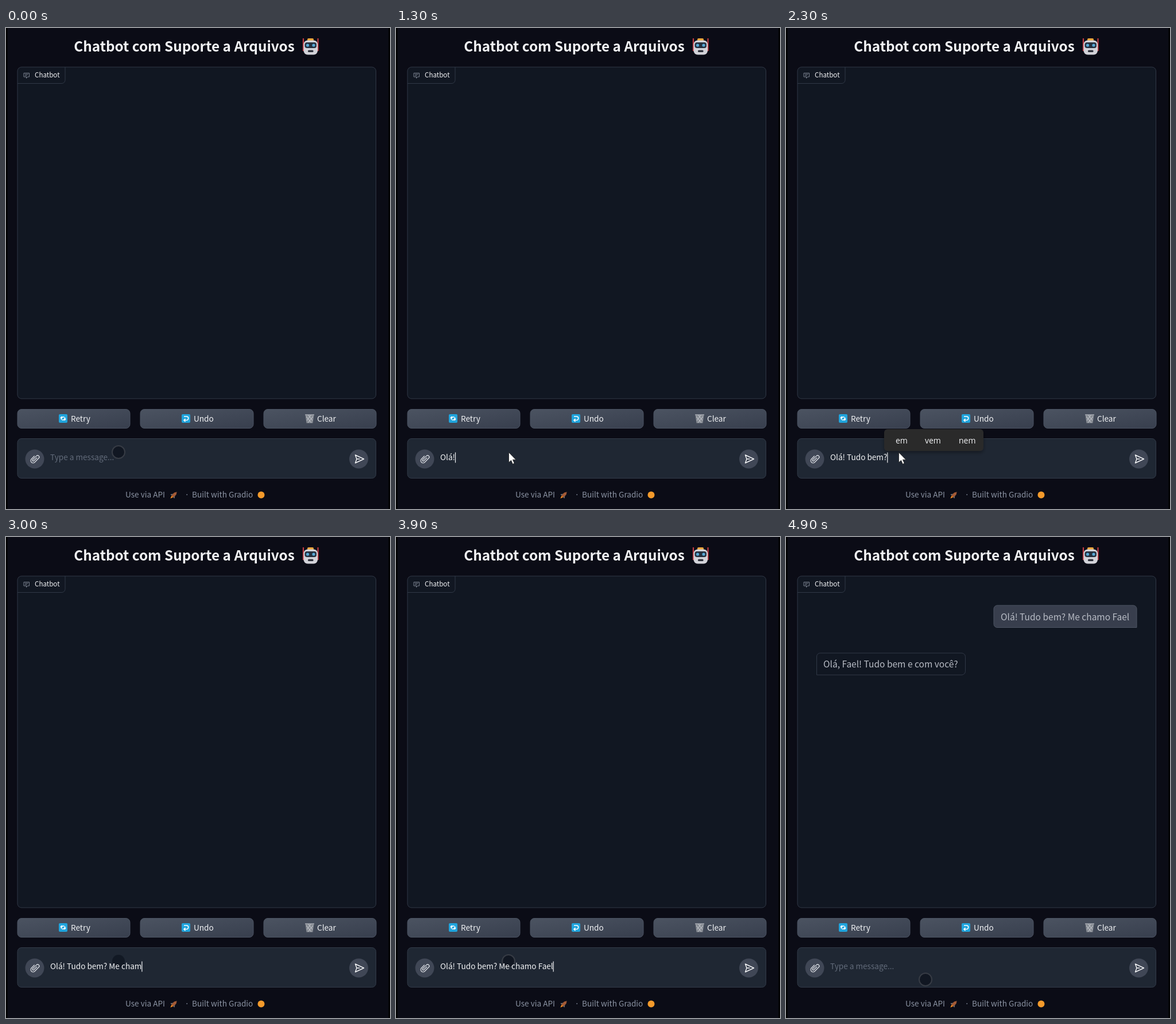
An HTML page that plays this animation: 669 px wide and 837 px high, repeating every 5 s.

```html
<!DOCTYPE html>
<html lang="pt">
<head>
<meta charset="utf-8">
<title>Chatbot</title>
<style>
html, body { margin: 0; width: 100%; height: 100%; overflow: hidden; background: #000; }
svg { display: block; width: 669px; height: 837px; }
text { font: 13.6px 'Noto Sans CJK JP', 'Noto Sans CJK SC', 'Noto Sans', sans-serif; white-space: pre; fill: #f3f4f6; }
.title { font-size: 24.3px; font-weight: 700; }
.label { font-size: 11.6px; }
.btn { font-weight: 500; }
.foot { fill: #8b93a3; }
.msg { font-size: 15.5px; fill: #b9bdc6; }
.pop text { font: 14px 'Open Sans', 'Noto Sans', sans-serif; }
.time { font: bold 13.7px 'Liberation Mono', monospace; }
.line { fill: none; stroke: #d5d8de; stroke-width: 1.4; stroke-linejoin: round; stroke-linecap: round; }
</style>
</head>
<body>
<svg viewBox="0 0 669 837">
  <defs>
    <linearGradient id="btn" x2="1" y2="1">
      <stop stop-color="#4b5361"/><stop offset="1" stop-color="#383f4e"/>
    </linearGradient>
    <filter id="shadow" x="-10%" y="-20%" width="120%" height="160%">
      <feDropShadow dx="0" dy="3" stdDeviation="3" flood-opacity=".35"/>
    </filter>
    <clipPath id="cut"><path d="M85 690h160v56H85z"/></clipPath>
  </defs>
  <path d="M2.5 0H666.500V837H2.500z" fill="#0b0c16"/>

  <text class="title" x="310.500" y="41" text-anchor="middle">Chatbot com Suporte a Arquivos</text>
  <g id="robot">
    <path d="M518 18v22M543.500 18v22" stroke="#c23a42" stroke-width="2.200"/>
    <rect x="525" y="18" width="11" height="7" rx="2" fill="#eda63c"/>
    <rect x="518.500" y="21.500" width="24.500" height="25" rx="7" fill="#d3d3d9"/>
    <rect x="520.500" y="25" width="20.500" height="10" rx="4" fill="#26313f"/>
    <circle cx="525.500" cy="30" r="2.600" fill="#58a9d6"/>
    <circle cx="536" cy="30" r="2.600" fill="#58a9d6"/>
    <rect x="526" y="38.500" width="9.500" height="3.500" rx="1.500" fill="#30323c"/>
  </g>

  <rect x="20" y="68" width="624.500" height="577" rx="7" fill="#111722" stroke="#303846"/>
  <path d="M20 96.500H97a6 6 0 0 0 6-6V68" fill="none" stroke="#303846"/>
  <path d="M31 78.500h9.500v6.500h-3l-2 2.500v-2.500H31zM33 80.700h5.500M33 82.800h3.500" fill="none" stroke="#7b8290"/>
  <text class="label" x="50" y="86">Chatbot</text>

  <g id="chat">
    <path d="M368 119h237a6 6 0 0 1 6 6v32.500H368a6 6 0 0 1-6-6V125a6 6 0 0 1 6-6z" fill="#383e4d" stroke="#4d5463"/>
    <text class="msg" x="374" y="144.500">Olá! Tudo bem? Me chamo Fael</text>
  </g>
  <g id="pending">
    <rect x="20.500" y="168.500" width="624" height="69.500" rx="22" fill="#393e4e"/>
    <g id="dots" fill="#f3f4f6">
      <circle cx="318" cy="203" r="4"/><circle cx="333" cy="203" r="4"/><circle cx="348" cy="203" r="4"/>
    </g>
    <path d="M595 68.500h43a6 6 0 0 1 6 6V96h-49z" fill="#1f2733"/>
    <text class="time" id="timer" x="603" y="86"></text>
  </g>
  <g id="reply">
    <path d="M59.500 202h246.500a6.500 6.500 0 0 1 6.500 6.500v25a6.500 6.500 0 0 1-6.500 6.500H53.500V208a6 6 0 0 1 6-6z" fill="#111722" stroke="#303846"/>
    <text class="msg" x="65" y="227">Olá, Fael! Tudo bem e com você?</text>
  </g>

  <g fill="url(#btn)" stroke="#4b5362">
    <rect x="20" y="663.500" width="196" height="33" rx="7"/>
    <rect x="234" y="663.500" width="197" height="33" rx="7"/>
    <rect x="449" y="663.500" width="196" height="33" rx="7"/>
  </g>
  <g fill="#20a4dc">
    <rect x="92" y="672" width="15" height="15" rx="2"/>
    <rect x="306" y="672" width="15" height="15" rx="2"/>
  </g>
  <g fill="none" stroke="#fff" stroke-width="1.600">
    <path d="M96.500 681.500v-4.500h5M95 679l1.500-2 1.500 2M102.500 677.500v4.500h-5M101 680l1.500 2 1.500-2"/>
    <path d="M310 676h4.500a3.200 3.200 0 0 1 0 6.500H310M312.500 680l-2.500 2.500 2.500 2.500"/>
  </g>
  <path d="M521.500 673h15l-2 14.500h-11z" fill="#858a92"/>
  <path d="M521 673h16M523 676l9 11M527 674l7 9M535 676l-9 11M531 674l-7 9" stroke="#c7cad0" fill="none"/>
  <text class="btn" x="113" y="685">Retry</text>
  <text class="btn" x="327" y="685">Undo</text>
  <text class="btn" x="542" y="685">Clear</text>

  <rect x="20" y="714.500" width="624.500" height="69" rx="7" fill="#1f2733" stroke="#323b49"/>
  <circle cx="50" cy="750" r="16.500" fill="#404756"/>
  <path class="line" transform="translate(50 750) rotate(45)" d="M-4 -3v7a4 4 0 0 0 8 0V-6a2.800 2.800 0 0 0-5.600 0V3.500a1.400 1.400 0 0 0 2.800 0V-4"/>
  <circle cx="614.500" cy="750" r="16.500" fill="#404756"/>
  <path class="line" id="send" style="stroke:#f3f4f6" d="M608.500 743l15 7-15 7 2.500-7zM611 750h5"/>

  <circle id="spot" r="11" fill="#111722" stroke="#373c45" stroke-width="2"/>
  <text id="input" x="77" y="752"></text>
  <path id="caret" d="M0 738.500v18" stroke="#f3f4f6" stroke-width="1.200"/>
  <path id="arrow" d="M196.500 738.500v17.500l4-3.700 2.800 6.400 2.900-1.300-2.800-6.200h5.400z" fill="#fff" stroke="#222" stroke-width=".8"/>

  <g class="pop" id="pop1" clip-path="url(#cut)">
    <rect x="91.500" y="698" width="190" height="38" rx="6" fill="#2b292c" filter="url(#shadow)"/>
    <text x="112" y="722.500">Olá</text><text x="165" y="722.500">Olha</text><text x="225.500" y="722.500">Olo</text>
  </g>
  <g class="pop" id="pop2">
    <rect x="171" y="698" width="173" height="38" rx="6" fill="#2b292c" filter="url(#shadow)"/>
    <text x="191" y="722.500">em</text><text x="242" y="722.500">vem</text><text x="301" y="722.500">nem</text>
  </g>

  <text class="foot" x="208" y="817">Use via API</text>
  <g transform="translate(292 813) rotate(45)">
    <path d="M-2.500 3V-4L0 -8L2.500 -4V3z" fill="#a35a36"/>
    <path d="M-2.500 -1l-2.500 4h2.500zM2.500 -1l2.500 4h-2.500z" fill="#777b83"/>
    <path d="M-2 3h4l-2 5z" fill="#f58a1f"/>
  </g>
  <text class="foot" x="311.500" y="817">·</text>
  <text class="foot" x="324" y="817">Built with Gradio</text>
  <circle cx="444.500" cy="812.500" r="6" fill="#f39a2b"/>
</svg>
<script>
const LOOP = 5000, FOCUS = 200, SENT = 4200, ANSWER = 4900;
const MESSAGE = 'Olá! Tudo bem? Me chamo Fael';
// [time, value...] stops, joined by straight lines
const TYPING = [[250, 0], [500, 2], [1000, 4], [1300, 4], [2300, 14], [3400, 28]];
const SPOT = [[3900, 196, 738], [4200, 212, 746], [4800, 243, 770]];

const $ = id => document.getElementById(id);
const show = (id, on) => $(id).style.display = on ? '' : 'none';
const within = (t, a, b) => t >= a && t < b;

function track(stops, t, k = 1) {
  const i = stops.findIndex(s => s[0] > t);
  if (i === 0) return stops[0][k];
  if (i < 0) return stops[stops.length - 1][k];
  const a = stops[i - 1], b = stops[i];
  return a[k] + (b[k] - a[k]) * (t - a[0]) / (b[0] - a[0]);
}

const typed = t => t >= SENT ? 0 : Math.floor(track(TYPING, t) + 1e-6);

function lastKey(t) {
  if (t >= SENT) return SENT;
  let k = t;
  while (k > FOCUS && typed(k - 100) === typed(t)) k -= 100;
  return k;
}

const flash = s => s < 0 ? 1 : (1 - Math.cos(2 * Math.PI * s)) / 2;

function draw(t) {
  const n = typed(t), input = $('input');
  input.textContent = n ? MESSAGE.slice(0, n) : 'Type a message...';
  input.style.fill = n ? '#f3f4f6' : '#626b7a';
  const x = 77.5 + (n ? input.getComputedTextLength() : 0);
  $('caret').setAttribute('transform', `translate(${x})`);
  show('caret', t >= FOCUS && (t - lastKey(t)) % 1060 < 530);

  const arrow = within(t, 300, 2900), overText = within(t, 2900, 3900);
  show('arrow', arrow);
  show('spot', !arrow);
  $('spot').setAttribute('transform', `translate(${track(SPOT, t, 1)} ${track(SPOT, t, 2)})`);
  $('spot').style.strokeOpacity = overText ? 0 : 1;
  $('spot').style.fillOpacity = overText ? .85 : 1;

  show('pop1', within(t, 500, 800));
  show('pop2', within(t, 2200, 2500));

  const waiting = within(t, SENT, ANSWER), s = (t - SENT) / 1000;
  show('chat', t >= SENT);
  show('pending', waiting);
  show('reply', t >= ANSWER);
  $('send').style.opacity = waiting ? .75 : 1;
  $('timer').textContent = s.toFixed(1) + 's';
  [.33, .66, 0].forEach((delay, i) => $('dots').children[i].style.opacity = flash(s - delay));
}

const start = performance.now();
function frame() {
  const t = (performance.now() - start) % LOOP;
  draw(Math.floor(t / 100) * 100);
  requestAnimationFrame(frame);
}
frame();
</script>
</body>
</html>
```
